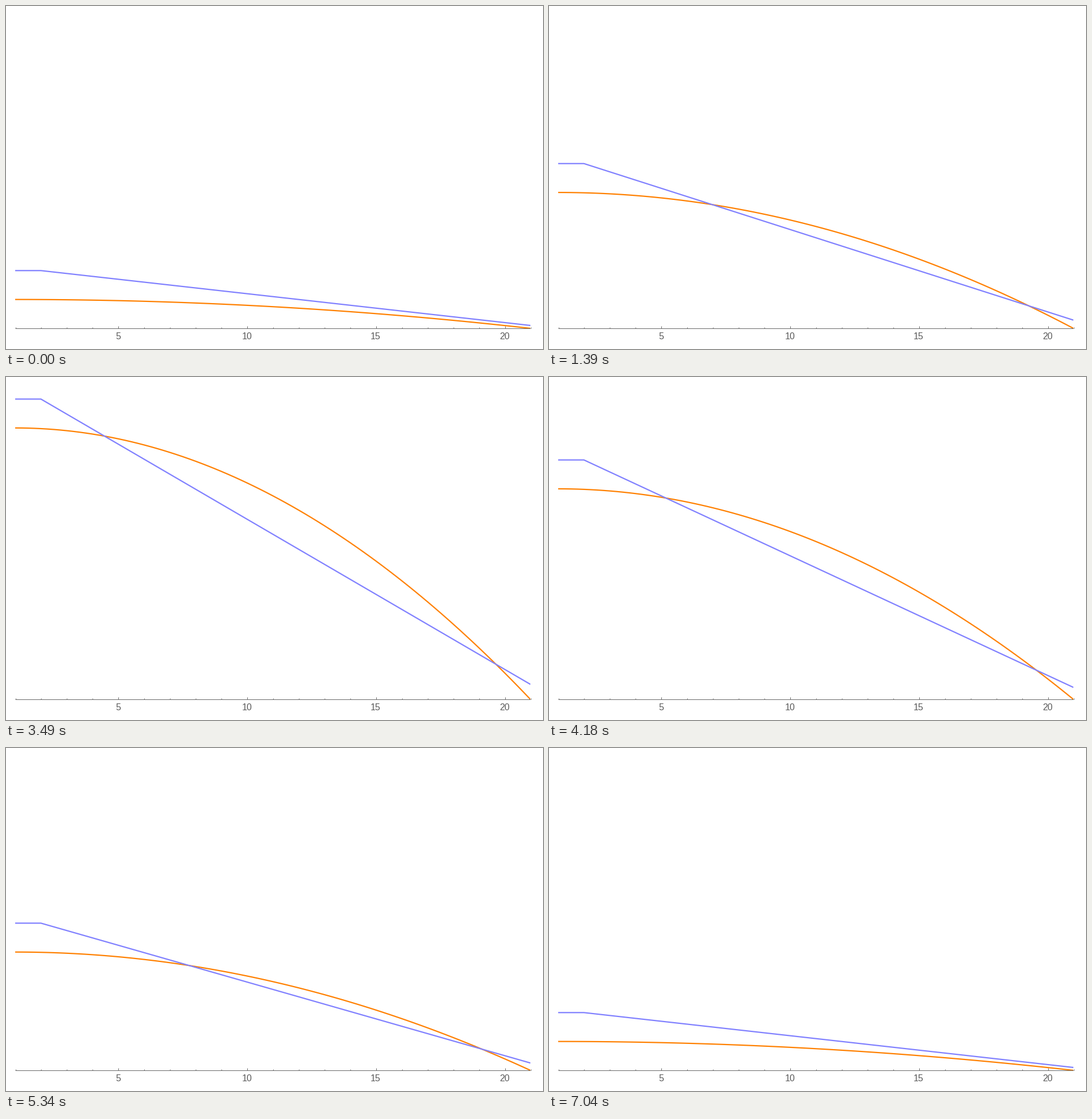
A matplotlib script for the animation above (7.19 s loop, 937 by 598 pixels).

```python
import matplotlib.pyplot as plt
import numpy as np
from matplotlib.animation import FuncAnimation

W, H, DPI = 937, 598, 64
LOOP, STEP = 7190, 10
PX = 72 / DPI                      # one pixel in points
LEFT, RIGHT, BASE = 16, 915, 562   # plot area in pixels
UNIT = 50.35                       # pixels per unit of height
LOW, HIGH = BASE - 2 * UNIT, BASE - 11 * UNIT

# The level rises steadily, rests at the top and sinks more slowly
KEY_TIMES = [440, 840, 1390, 2310, 2700, 3250, 3490, 4870, 5950, 6340, 6490]
KEY_LEVELS = [LOW, 368, 275, 94, HIGH, HIGH, 40, 251, 403, 455, LOW]

TICK = 77.3          # ms between refreshes
HOLD_EVERY = 4.16    # one refresh in this many repeats the last picture
HOLD_PHASE = 7.5


def level_at(ms):
    tick = int((ms + STEP - 0.01) // TICK)
    if (tick - HOLD_PHASE) % HOLD_EVERY > HOLD_EVERY - 1:
        tick -= 1
    return np.interp(tick * TICK, KEY_TIMES, KEY_LEVELS)


def to_px(x):
    return LEFT + (x - 1) * (RIGHT - LEFT) / 20


fig = plt.figure(figsize=(W / DPI, H / DPI), dpi=DPI, facecolor="white")
ax = fig.add_axes([0, 0, 1, 1])
ax.set(xlim=(0, W), ylim=(H, 0))
ax.axis("off")

# Horizontal axis with ticks and labels
axis_style = dict(color="#6a6a6a", lw=PX, zorder=1)
ax.hlines(BASE - 0.5, LEFT, RIGHT, **axis_style)
for n in range(1, 22):
    major = n % 5 == 0
    ax.vlines(np.floor(to_px(n)) + 0.5, BASE - (4 if major else 2), BASE,
              **axis_style)
    if major:
        ax.text(to_px(n) - 0.3, 581, str(n), ha="center", va="baseline",
                family="Liberation Sans", size=16 * PX, color="#5c5c5c")

x = np.linspace(1, 21, 81)
parabola = 1 - ((x - 1) / 20) ** 2
ramp_x = np.array([1, 2, 21])
ramp = (22 - np.maximum(ramp_x, 2)) / 20

plot_area = plt.Rectangle((LEFT, 0), RIGHT - LEFT, BASE,
                          transform=ax.transData)
style = dict(lw=2.2 * PX, solid_capstyle="butt", snap=False)
curve, = ax.plot(to_px(x), parabola, color="#ff8000", zorder=2, **style)
line, = ax.plot(to_px(ramp_x), ramp, color="#8080ff", zorder=3, **style)
for artist in (curve, line):
    artist.set_clip_path(plot_area)


def update(i):
    height = BASE - level_at(i * STEP)
    line.set_ydata(BASE - height * ramp)
    curve.set_ydata(BASE - (height - UNIT) * parabola)
    return curve, line


anim = FuncAnimation(fig, update, frames=LOOP // STEP, interval=STEP,
                     repeat=True, repeat_delay=0, blit=False)
plt.show()
```
